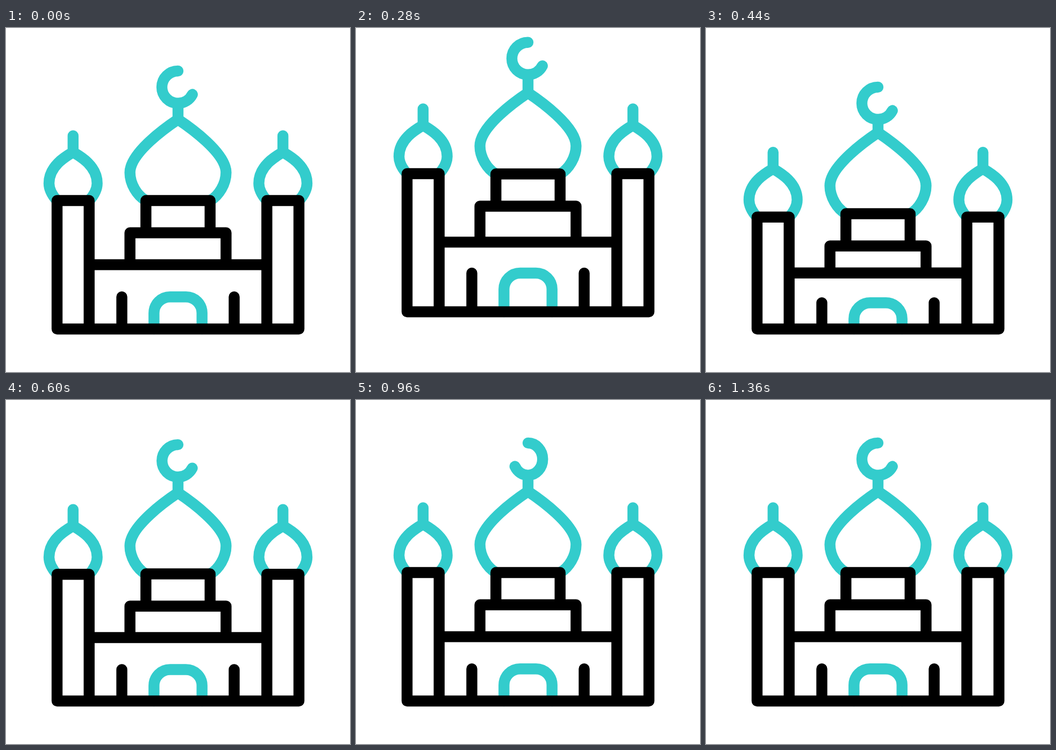
These frames come from a looping animation (640x640 px, 1480 ms). An HTML page:

```html
<!DOCTYPE html>
<html lang="en">
<head>
<meta charset="utf-8">
<title>Domed building</title>
<style>
  html, body { margin: 0; width: 100%; height: 100%; overflow: hidden; background: #fff; }
  svg { display: block; width: 100%; height: 100%; }
  path { fill: none; stroke-width: 20.4; stroke-linecap: round; stroke-linejoin: round; }
  #teal { stroke: #33cccc; }
  #black { stroke: #000; }
</style>
</head>
<body>
<svg viewBox="0 0 640 640">
  <path id="teal"/>
  <path id="black"/>
</svg>
<script>
const LOOP = 1480, STEP = 40;
const teal = document.getElementById('teal');
const black = document.getElementById('black');

// Eased value of a track of [time, value] keys.
function track(keys, t) {
  if (t <= keys[0][0]) return keys[0][1];
  for (let i = 1; i < keys.length; i++) {
    const [t0, a] = keys[i - 1], [t1, b] = keys[i];
    if (t < t1) {
      const p = (t - t0) / (t1 - t0);
      return a + (b - a) * p * p * (3 - 2 * p);
    }
  }
  return keys[keys.length - 1][1];
}

// Jump up, squash on landing, settle.
const bounce = (t, up, down, start = 40) =>
  track([[start, 0], [280, up], [440, down], [640, 0]], t);

const spin = [[584, 1], [1016, -1], [1360, 1]];

// Both halves of an onion dome; w is the half width, b the half base.
function onion(x, y, w, h, b, base, c) {
  const half = s =>
    `M${x} ${y}C${x + s * c[0]} ${y + c[1]} ${x + s * w} ${y + c[2]} ${x + s * w} ${y + h}` +
    `C${x + s * w} ${y + h + c[3]} ${x + s * c[4]} ${base - 9} ${x + s * b} ${base}`;
  return half(-1) + half(1);
}

// Crescent of radius 30, squeezed sideways by s.
function crescent(y, s) {
  const pt = (x, dy) => `${320 + x * s} ${y + dy} `;
  return 'M' + pt(0, -30) +
    'C' + pt(-16.57, -30) + pt(-30, -16.57) + pt(-30, 0) +
    'C' + pt(-30, 16.57) + pt(-16.57, 30) + pt(0, 30) +
    'C' + pt(11.28, 30) + pt(21.6, 23.7) + pt(26.7, 13.6);
}

const line = (x, y0, y1) => `M${x} ${y0}V${y1}`;
const frame = (x0, x1, top, bottom) => `M${x0} ${bottom}V${top}H${x1}V${bottom}`;

function draw(t) {
  const dome = bounce(t, -49.5, 24.5);
  const moon = dome + bounce(t, -3.7, 5.5, 160);
  const side = bounce(t, -50, 30.8);
  const base = 560 + bounce(t, -32, 0);
  const band = 440.4 + bounce(t, -42, 15.4);
  const door = 500.3 + bounce(t, -44.3, 11);

  const small = x => line(x, 200.5 + side, 231 + side) +
    onion(x, 231 + side, 44.8, 58, 30, 321 + side, [12, 7, 25, 13]
      .concat(38));

  teal.setAttribute('d',
    crescent(110 + moon, track(spin, t)) +
    line(320, 140 + moon, 170 + dome) +
    onion(320, 170 + dome, 89.4, 99, 60, 321 + dome, [21, 14, 62, 21, 76]) +
    small(124.8) + small(515.2) +
    `M275.3 ${base}V${door + 30}a30 30 0 0 1 30-30h29.4a30 30 0 0 1 30 30V${base}`);

  black.setAttribute('d',
    frame(95, 154.7, 321 + side, base) +
    frame(485.3, 545, 321 + side, base) +
    `M95 ${base}H545M154.7 ${band}H485.3` +
    frame(260.3, 379.7, 321 + dome, 381 + dome) +
    frame(230.6, 409.4, 381 + dome, band) +
    line(215.5, door, base) + line(424.5, door, base));
}

const start = performance.now();
function tick() {
  const t = (performance.now() - start) % LOOP;
  draw(Math.floor(t / STEP) * STEP);
  requestAnimationFrame(tick);
}
tick();
</script>
</body>
</html>
```
